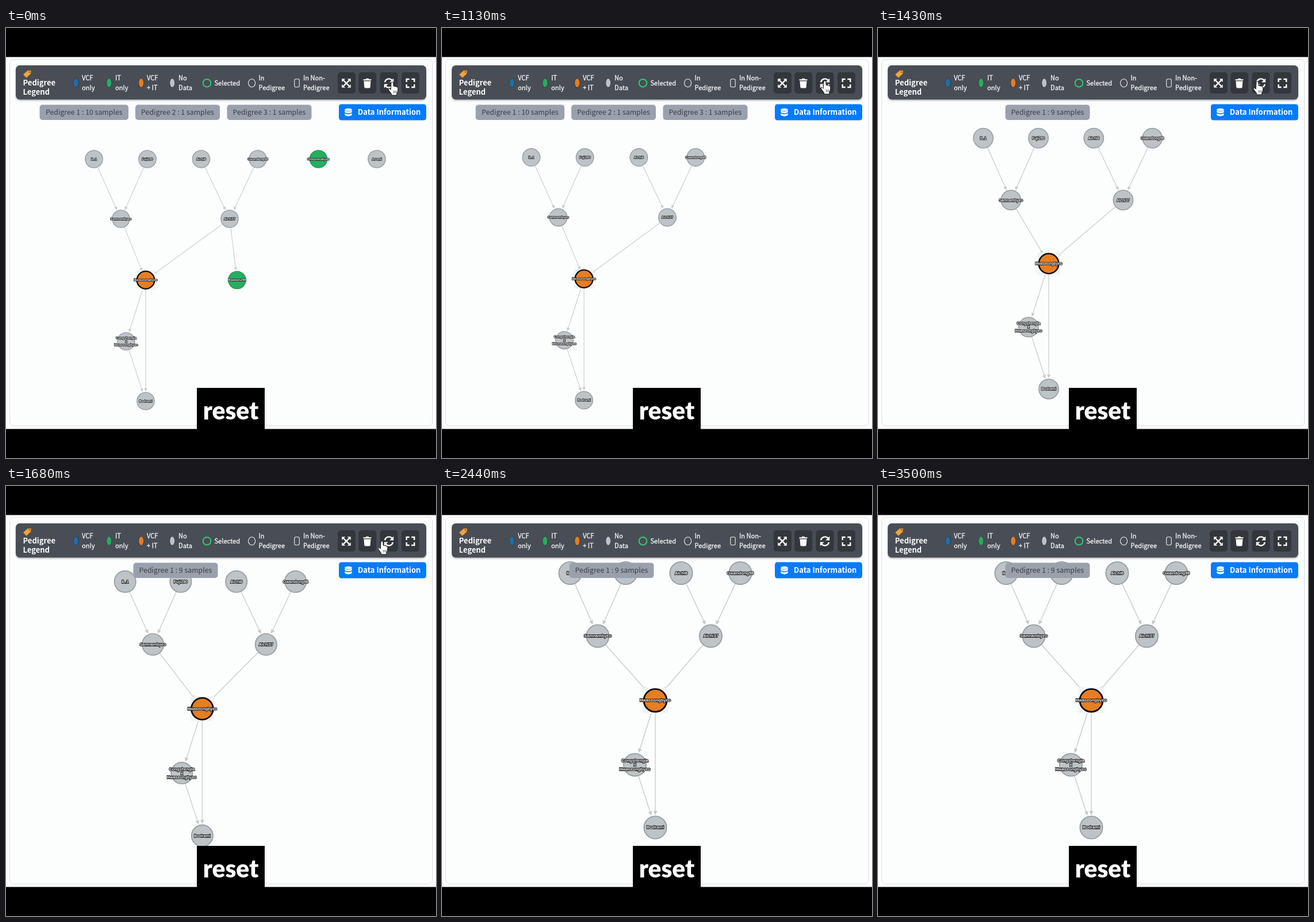
Recreate the animation shown at these times as an HTML page. Size 748 px wide and 748 px high, loop 3.52 s.

```html
<!DOCTYPE html>
<html lang="en">
<head>
<meta charset="utf-8">
<title>Pedigree reset</title>
<style>
  html, body { margin: 0; width: 100%; height: 100%; overflow: hidden; background: #000; }
  svg { display: block; width: 100vw; height: 100vh; }
  text { font-family: "Noto Sans CJK KR", "Noto Sans CJK JP", "Noto Sans CJK SC", "Noto Sans CJK", "Noto Sans", sans-serif; }
  .key text { font-size: 11.1px; fill: #f4f5f6; stroke: #f4f5f6; stroke-width: .3; }
  .tag rect { fill: #9ba0ad; }
  .tag text { font-size: 12.35px; fill: #393d45; text-anchor: middle; }
  .line { fill: none; stroke: #fff; stroke-width: 2.4; }
  .label { font-family: "Liberation Sans", Arial, sans-serif; font-weight: bold; text-anchor: middle;
           fill: #fff; stroke: #111; stroke-linejoin: round; paint-order: stroke; }
  .caption { font-family: Lato, "Open Sans", sans-serif; font-size: 42.5px; font-weight: 900; fill: #fff; text-anchor: middle; }
</style>
</head>
<body>
<svg viewBox="0 0 748 748">
  <defs>
    <filter id="shadow" x="-5%" y="-20%" width="110%" height="150%">
      <feDropShadow dx="0" dy="1.5" stdDeviation="1.5" flood-opacity=".3"/>
    </filter>
  </defs>
  <rect width="748" height="748"/>
  <rect y="50.5" width="748" height="647" fill="#fdfdfd"/>
  <rect x="6.5" y="54.5" width="735.5" height="637.5" rx="7" fill="#fcfdfd" stroke="#dedfe0"/>
  <g id="graph"></g>

  <rect x="17" y="65" width="714" height="59.5" rx="7" fill="#4a4e55" filter="url(#shadow)"/>
  <g transform="translate(38 79) rotate(-42)">
    <path d="M-7-3.8H3L7.2 0 3 3.8H-7Z" fill="#f2a43c" stroke="#d98b2b" stroke-width=".7"/>
    <circle cx="3.6" r="1.1" fill="#5b4a3a"/>
  </g>
  <g font-size="13" font-weight="700" fill="#fff">
    <text x="29.5" y="100">Pedigree</text>
    <text x="29.5" y="116">Legend</text>
  </g>
  <g class="key" id="key"></g>

  <g id="buttons" fill="#33363b"></g>
  <g class="line">
    <path d="M586.5 90.5l11 11m0-11l-11 11"/>
    <path d="M696.7 94v-5h5M705.3 89h5v5M710.3 98v5h-5M701.7 103h-5v-5"/>
    <path d="M659 94.3a7.3 7.3 0 0 1 12.6-3.4M673 97.7a7.3 7.3 0 0 1-12.6 3.4"/>
  </g>
  <g fill="#fff">
    <path d="M584.3 88.3h5.8l-5.8 5.8zM599.7 88.3v5.8l-5.8-5.8zM584.3 103.7v-5.8l5.8 5.8zM599.7 103.7h-5.8l5.8-5.8z"/>
    <path d="M674.2 87.6v6.9h-6.9zM657.8 104.4v-6.9h6.9z"/>
    <path d="M621.5 89.2h4l1-1.4h4l1 1.4h4v2h-14zM622.5 92.4h12l-.8 10.4q-.1 1.6-1.7 1.6h-7q-1.6 0-1.7-1.6z"/>
  </g>

  <g id="tags" class="tag"></g>
  <rect x="579" y="132.5" width="152" height="28" rx="4.5" fill="#067bff"/>
  <g fill="#fff">
    <ellipse cx="595.5" cy="142.2" rx="6.2" ry="2.4"/>
    <path d="M589.3 143.6q6.2 3.8 12.4 0v3.2q-6.2 3.6-12.4 0z"/>
    <path d="M589.3 148.2q6.2 3.8 12.4 0v3.4q-6.2 4.2-12.4 0z"/>
    <text x="666.7" y="151.3" font-size="13" font-weight="700" text-anchor="middle">Data Information</text>
  </g>

  <g id="cursor">
    <path d="M-2.4-10.4q1.9-1.7 3.6.3l.6 6.6q1.6-.9 2.7.5 1.7-.8 2.6.8 2.2-.3 2.3 2l-.4 5.6-1.7 3.5v3h-9.2v-2.3L-6.8 3q-1-2.3.8-2.7 1.4 0 2.8 2z"
      transform="translate(-.5 0)" fill="#fff" stroke="#111" stroke-width=".9" stroke-linejoin="round"/>
    <path d="M1.5 4v4.5M3.9 4v4.5M6.2 4v4.5" stroke="#222" stroke-width=".7"/>
  </g>

  <rect x="332" y="626" width="118" height="72"/>
  <text class="caption" x="391" y="681">reset</text>
</svg>

<script>
const LOOP = 3520, STEP = 50, PHASE = 30;
const REMOVE_AT = 1080, MOVE_AT = 1105, MOVE_FOR = 735, RETAG_AT = 1280, CURSOR_HIDE = 2400;
const ZOOM = 1.3, PAN = [10, -191], RADIUS = 15.8;
const $ = id => document.getElementById(id);
const mix = (a, b, p) => a + (b - a) * p;
const clamp = v => Math.min(1, Math.max(0, v));

const GRAY = ["#bdc3c7", "#969c9f"], GREEN = ["#27ae60", "#219653"], ORANGE = ["#e67e22", "#0c0c0c"];
const node = (label, from, to, color = GRAY) => ({ label: label.split("|"), from, to, color });
// Nodes without a second position disappear on reset.
const nodes = {
  il: node("IL.1", [153, 228], [223, 151.5]),
  fuji: node("Fuji280", [246, 228], [319.5, 151.5]),
  aichi6: node("Aichi6", [339.5, 228], [416, 151.5]),
  gwan: node("Gwandong98", [438, 228], [519, 151.5]),
  sam: node("Samnambyeo", [200, 332], [271, 261]),
  aichi37: node("Aichi37", [389, 332], [467.5, 261]),
  hwa: node("Hwaseongbyeo", [243, 438.5], [371, 373], ORANGE),
  cong: node("Congshengla|x|Hwaseongbyeo", [209, 545], [335.5, 485]),
  bod: node("Bodrami", [243, 649], [371, 594]),
  cheon: node("Cheonmabyeo", [543.5, 228], null, GREEN),
  asami: node("Asami", [645, 228], null),
  baw: node("Bawean288", [402, 438.5], null, GREEN)
};
const edges = "il-sam fuji-sam aichi6-aichi37 gwan-aichi37 sam-hwa aichi37-hwa aichi37-baw hwa-cong hwa-bod cong-bod"
  .split(" ").map(e => e.split("-"));

// Layout, zoom and pan all run linearly at once.
function place({ from, to }, p) {
  return from.map((start, i) => {
    const end = to ? (to[i] - PAN[i]) / ZOOM : start;
    return mix(start, end, p) * mix(1, ZOOM, p) + PAN[i] * p;
  });
}

function edgeSvg([x1, y1], [x2, y2], r) {
  const len = Math.hypot(x2 - x1, y2 - y1), ux = (x2 - x1) / len, uy = (y2 - y1) / len;
  const tip = r + 1, back = tip + r * 0.36, w = r * 0.17;
  const bx = x2 - ux * back, by = y2 - uy * back;
  return `<path d="M${x1 + ux * r} ${y1 + uy * r}L${bx} ${by}" stroke="#cfcfcf" stroke-width="${r * 0.075}"/>
    <path d="M${x2 - ux * tip} ${y2 - uy * tip}L${bx - uy * w} ${by + ux * w}L${bx + uy * w} ${by - ux * w}Z" fill="#c8c9ca"/>`;
}

function nodeSvg({ label, color }, [x, y], r) {
  const selected = color === ORANGE, border = r * (selected ? 0.14 : 0.085);
  const radius = r * (selected ? 1.04 : 1) - border / 2;
  const size = r * 0.36, middle = (label.length - 1) / 2;
  const lines = label.map((s, i) =>
    `<text class="label" x="${x}" y="${y + r * 0.12 + (i - middle) * size}" font-size="${size}" stroke-width="${r * 0.09}">${s}</text>`);
  return `<circle cx="${x}" cy="${y}" r="${radius}" fill="${color[0]}" stroke="${color[1]}" stroke-width="${border}"/>${lines.join("")}`;
}

function drawGraph(t) {
  const p = clamp((t - MOVE_AT) / MOVE_FOR), r = RADIUS * mix(1, ZOOM, p);
  const shown = Object.keys(nodes).filter(k => nodes[k].to || t < REMOVE_AT);
  const at = Object.fromEntries(shown.map(k => [k, place(nodes[k], p)]));
  const [hx, hy] = at.hwa, h = r * 1.09;
  $("graph").innerHTML =
    edges.filter(([a, b]) => at[a] && at[b]).map(([a, b]) => edgeSvg(at[a], at[b], r)).join("") +
    `<rect x="${hx - h}" y="${hy - h}" width="${2 * h}" height="${2 * h}" rx="2" fill="#f2f3f6"/>` +
    shown.map(k => nodeSvg(nodes[k], at[k], r)).join("");
}

const tagSvg = ([x, w, s]) =>
  `<rect x="${x}" y="133.5" width="${w}" height="26.5" rx="5"/><text x="${x + w / 2}" y="151.3">${s}</text>`;
const tagsBefore = [[58.5, 154.5, "Pedigree 1 : 10 samples"], [225, 147, "Pedigree 2 : 1 samples"], [384.5, 147, "Pedigree 3 : 1 samples"]].map(tagSvg).join("");
const tagsAfter = tagSvg([221.5, 147, "Pedigree 1 : 9 samples"]);

// Cursor stops: time, x, y
const path = [[0, 673, 105], [880, 673, 105], [1130, 667, 103], [1430, 661, 104], [1680, 655, 107], [1780, 654, 107], [LOOP, 654, 107]];
function drawCursor(t) {
  const i = path.findIndex(s => s[0] > t), [a, b] = [path[i - 1], path[i]];
  const p = (t - a[0]) / (b[0] - a[0]);
  $("cursor").setAttribute("transform", `translate(${mix(a[1], b[1], p)} ${mix(a[2], b[2], p)})`);
  $("cursor").setAttribute("visibility", t < CURSOR_HIDE ? "visible" : "hidden");
}

const keyText = (x, ...lines) => lines.map((s, i) =>
  `<text x="${x}" y="${lines.length > 1 ? 91 + 17 * i : 100}">${s}</text>`).join("");
const dot = (x, fill) => `<ellipse cx="${x}" cy="95.5" rx="4.4" ry="7.8" fill="${fill}" stroke="#33393f" stroke-width=".8"/>`;
$("key").innerHTML =
  dot(121.5, "#1f6fa6") + keyText(132, "VCF", "only") +
  dot(179.3, "#27ae60") + keyText(190, "IT", "only") +
  dot(235.2, "#e67e22") + keyText(245, "VCF", "+ IT") +
  dot(289.2, "#bdc3c7") + keyText(300, "No", "Data") +
  `<circle cx="349.5" cy="95.7" r="6.8" fill="none" stroke="#2ecc71" stroke-width="2"/>` + keyText(362.5, "Selected") +
  `<ellipse cx="427.6" cy="95.7" rx="6" ry="7" fill="none" stroke="#eee" stroke-width="1.1"/>` + keyText(439.5, "In", "Pedigree") +
  `<rect x="501.8" y="88.7" width="8.4" height="14" rx="2.5" fill="none" stroke="#eee" stroke-width="1.1"/>` + keyText(517, "In Non-", "Pedigree");
$("buttons").innerHTML = [577, 613.2, 650.4, 688].map(x => `<rect x="${x}" y="77" width="31" height="37" rx="5"/>`).join("");

let tagState;
function render(now) {
  const t = now % LOOP;
  const stepped = Math.max(0, PHASE + STEP * Math.floor((t - PHASE) / STEP));
  drawGraph(stepped);
  drawCursor(stepped);
  const tags = stepped < RETAG_AT ? tagsBefore : tagsAfter;
  if (tags !== tagState) $("tags").innerHTML = tagState = tags;
}

function tick() {
  render(performance.now());
  requestAnimationFrame(tick);
}
tick();
</script>
</body>
</html>
```
